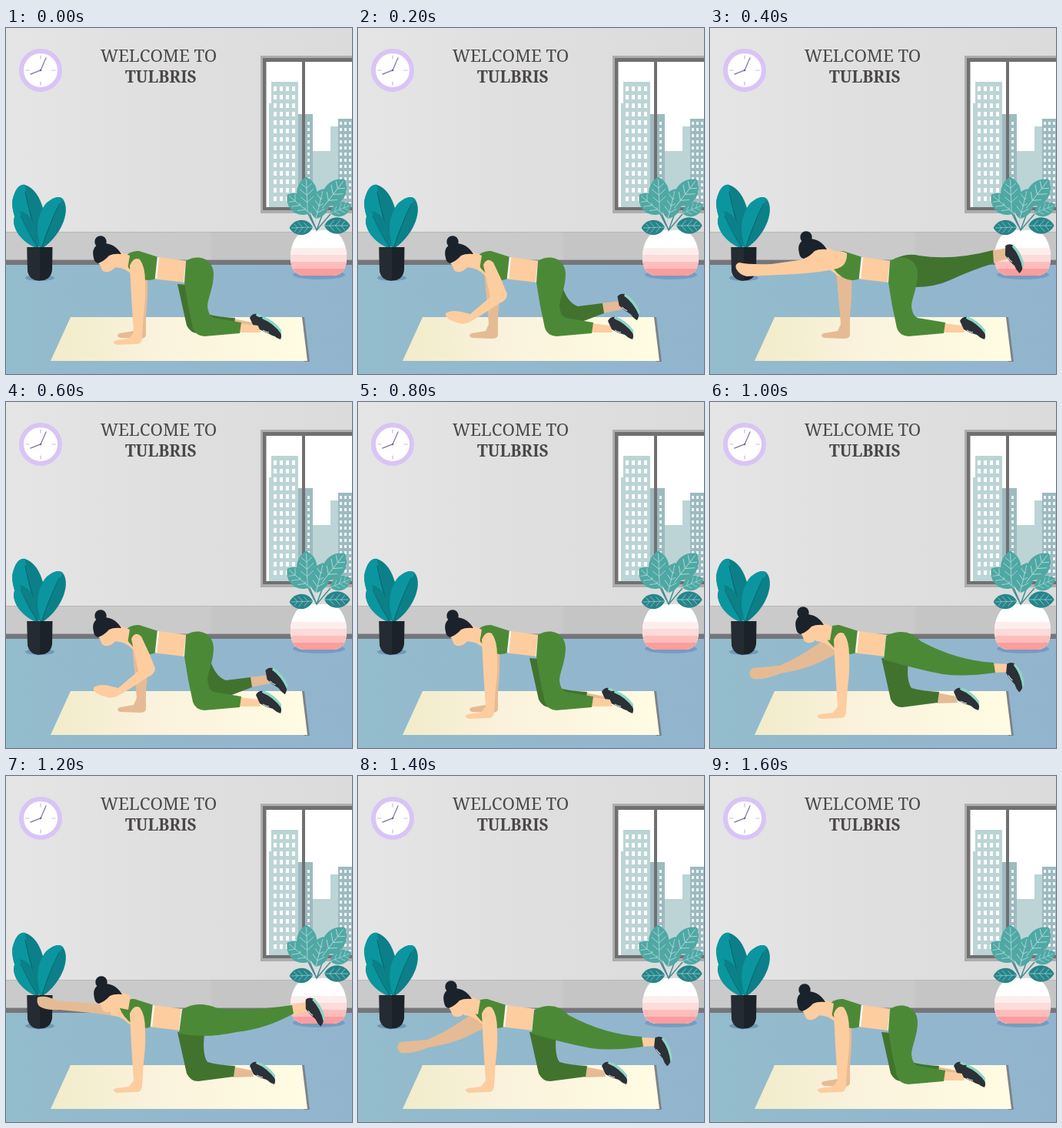
An HTML page without scripts that plays this animation: 450 by 450 pixels, repeating every 1.8 s.

```html
<!DOCTYPE html>
<html lang="en">
<head>
<meta charset="utf-8">
<title>Workout</title>
<style>
  html, body { margin: 0; width: 100%; height: 100%; overflow: hidden; }
  svg { display: block; width: 100vw; height: 100vh; }
  text { font-family: "Noto Serif", serif; fill: #4b4748; text-anchor: middle; }
  .near { fill: #4c8937; }
  .far { fill: #41732f; }
  .skin { fill: #fdcd9f; }
  .tan { fill: #e5bb95; }
  .hair { fill: #1a222b; }
  .pose {
    visibility: hidden;
    animation: show 1.8s step-end infinite;
    animation-delay: calc(var(--i) * .2s - 1.8s);
  }
  @keyframes show {
    0% { visibility: visible; }
    11.1112%, 100% { visibility: hidden; }
  }
</style>
</head>
<body>
<svg viewBox="0 0 450 450">
  <defs>
    <linearGradient id="wall"><stop stop-color="#e5e5e5"/><stop offset=".5" stop-color="#dfdfdf"/><stop offset="1" stop-color="#dbdbdb"/></linearGradient>
    <linearGradient id="floor"><stop stop-color="#93bccc"/><stop offset="1" stop-color="#92b4ce"/></linearGradient>
    <linearGradient id="mat"><stop stop-color="#f1ecca"/><stop offset=".4" stop-color="#faf2dc"/><stop offset="1" stop-color="#fffce3"/></linearGradient>
    <pattern id="panes" x="348" y="76" width="8" height="11" patternUnits="userSpaceOnUse"><path d="M0 0h4v6h-4z" fill="#fff"/></pattern>
    <pattern id="smallPanes" x="434" y="122" width="6" height="8" patternUnits="userSpaceOnUse"><path d="M0 0h3v4h-3z" fill="#eef5f5"/></pattern>

    <g id="leaf">
      <path d="M0 0C-17-18-26-45-18-66Q-8-84 2-80C21-68 19-25 0 0Z" fill="#0b8088"/>
      <path d="M0 0C-17-18-26-45-18-66Q-8-84 2-80Q-3-45 0 0Z" fill="#0b969f"/>
      <path d="M0 0Q-3-40 0-72" fill="none" stroke="#0b5f6b"/>
    </g>
    <g id="sprig">
      <path d="M0 0C-17-8-17-31 0-40C17-31 17-8 0 0Z"/>
      <path d="M0 4V-37M0-8l-8-7M0-8l8-7M0-17l-9-8M0-17l9-8M0-26l-7-6M0-26l7-6" fill="none" stroke="#b4dcda" stroke-width=".8"/>
    </g>

    <g id="shoe">
      <path d="M-17-8Q-14-14-7-13Q6-7 15 6Q17 12 15 16Q9 14 5 10Q-4 8-12 3Z" fill="#2b3136"/>
      <path d="M-8-14Q7-9 16 4L16 9Q6-5-9-11Z" fill="#8fd6c6"/>
      <path d="M-8 4l4 2l4 1" fill="none" stroke="#eef3f3"/>
    </g>

    <path id="armDown" d="M161 309Q166 297 174 301Q181 310 181 330Q182 350 179 372L177 402Q177 411 170 411L144 412Q136 409 143 406L160 404L166 396L163 350Z"/>
    <path id="farArmDown" d="M164 316L184 325Q185 350 182 375L182 400Q181 404 174 404L148 403Q142 400 148 397L166 394L170 385Z"/>
    <path id="farArmHalf" d="M163 298Q176 296 178 310Q174 326 155 332Q130 347 92 353Q70 362 56 360Q47 354 55 346L90 343Q122 330 163 298Z"/>
    <path id="armUp" d="M178 293Q170 288 158 291L115 302L80 307Q50 308 38 305Q32 307 34 313Q38 321 48 323L90 321Q140 319 165 313Q179 309 178 293Z"/>
    <path id="farArmUp" d="M165 300L115 296L66 292Q50 284 41 288Q39 298 46 301Q56 305 70 304L120 309L165 316Z"/>
    <path id="armBent" d="M163 308Q168 297 176 305Q186 325 194 346Q194 354 184 358Q160 374 146 382Q138 387 128 383Q112 378 114 371Q122 366 134 369L146 372L172 350Z"/>

    <g id="farKneel">
      <path class="tan" d="M295 378L320 383L322 391L295 392Z"/>
      <path class="far" d="M223 333L258 336Q255 362 262 372Q275 376 298 377L296 391L250 397Q240 397 235 387Z"/>
      <use href="#shoe" x="334" y="385"/>
    </g>
    <g id="nearKneel">
      <path class="skin" d="M303 384L328 387L331 396L303 396Z"/>
      <path class="near" d="M234 303C252 292 270 302 270 320C270 338 262 352 262 362Q263 374 270 377L306 383L304 397L258 401Q246 400 243 390Q236 360 232 331Z"/>
      <use href="#shoe" x="342" y="389"/>
    </g>
    <g id="farUp">
      <path class="tan" d="M365 290L388 286L390 299L367 306Z"/>
      <path class="far" d="M240 300Q258 292 272 296Q315 303 368 289L369 306Q340 315 312 328Q290 338 262 337Z"/>
      <use href="#shoe" transform="translate(396 298) rotate(26)"/>
    </g>
    <g id="farBent">
      <path class="tan" d="M316 358L342 355L344 366L317 371Z"/>
      <path class="far" d="M250 335L267 340Q274 358 286 362L318 358L320 371L291 382L264 380Z"/>
      <use href="#shoe" transform="translate(352 361) rotate(14)"/>
    </g>
    <g id="nearHalf">
      <path class="skin" d="M367 340L392 341L392 351L368 352Z"/>
      <path class="near" d="M229 304Q256 291 274 311Q320 336 369 339L371 352Q330 358 303 354Q270 348 226 335Z"/>
      <use href="#shoe" transform="translate(397 356) rotate(30)"/>
    </g>
    <g id="nearUp">
      <path class="skin" d="M370 298L394 293L396 305L373 311Z"/>
      <path class="near" d="M229 304Q248 291 275 302Q320 306 372 298L374 309Q338 329 300 333Q260 342 225 335Z"/>
      <use href="#shoe" transform="translate(402 305) rotate(24)"/>
    </g>

    <g id="torso">
      <path class="skin" d="M140 299L160 293L236 303L233 331L190 326L165 322Q156 312 143 311Z"/>
      <path class="near" d="M153 300Q160 289 173 290L198 298L195 326Q184 331 172 324Q158 314 153 300Z"/>
      <path d="M198 298L195 326M235 303L232 331" stroke="#f4f4f1" stroke-width="2.5"/>
    </g>
    <g id="head">
      <path class="skin" d="M119 298Q118 304 122 308L125 315Q129 319 136 316L143 311L158 314L161 296L146 290Z"/>
      <path class="hair" d="M114 299Q110 283 125 280Q141 279 150 294Q140 293 134 296Q128 303 120 306Q115 305 114 299Z"/>
      <circle class="hair" cx="123" cy="278" r="7.7"/>
    </g>

    <g id="rest">
      <use href="#farArmDown" class="tan"/>
      <use href="#farKneel"/>
      <use href="#torso"/>
      <use href="#nearKneel"/>
      <use href="#head"/>
      <use href="#armDown" class="skin"/>
    </g>
    <g id="nearArmBent">
      <use href="#farArmDown" class="tan"/>
      <use href="#farBent"/>
      <use href="#torso"/>
      <use href="#nearKneel"/>
      <use href="#head"/>
      <use href="#armBent" class="skin"/>
    </g>
    <g id="nearArmOut">
      <use href="#farArmDown" class="tan"/>
      <use href="#farUp"/>
      <use href="#torso"/>
      <use href="#nearKneel"/>
      <use href="#head" x="2" y="-6"/>
      <use href="#armUp" class="skin"/>
    </g>
    <g id="farArmRising">
      <use href="#farArmHalf" class="tan"/>
      <use href="#farKneel"/>
      <use href="#torso" x="-5"/>
      <use href="#nearHalf"/>
      <use href="#head" x="-2" y="-4"/>
      <use href="#armDown" class="skin"/>
    </g>
    <g id="farArmOut">
      <use href="#farArmUp" class="tan"/>
      <use href="#farKneel"/>
      <use href="#torso" x="-6"/>
      <use href="#nearUp"/>
      <use href="#head" x="1" y="-10"/>
      <use href="#armDown" class="skin"/>
    </g>
  </defs>

  <rect width="450" height="310" fill="url(#wall)"/>
  <path d="M0 265H450V303H0Z" fill="#c5c5c6"/>
  <path d="M0 265H267V303H0Z" fill="#cacaca"/>
  <path d="M0 265.5H450" stroke="#b8b8ba"/>
  <path d="M0 302H450V308H0Z" fill="#75767a"/>
  <path d="M0 301.500H450" stroke="#a5a5a9"/>
  <rect y="308" width="450" height="142" fill="url(#floor)"/>

  <text x="198.500" y="44" font-size="22.3">WELCOME TO</text>
  <text x="201.5" y="71" font-size="21" font-weight="700">TULBRIS</text>

  <g fill="none" stroke-linecap="round">
    <circle cx="45" cy="55" r="25" fill="#fff" stroke="#d8c4f6" stroke-width="6"/>
    <path d="M45 36v4M45 70v4M26 55h4M60 55h4" stroke="#c9b5e8" stroke-width="1.2"/>
    <path d="M52 39L45 55L32 60" stroke="#8f80a8" stroke-width="1.4"/>
    <circle cx="45" cy="55" r="1.3" fill="#75628f"/>
  </g>

  <g>
    <path d="M331 36H450V241H331Z" fill="#adadad"/>
    <path d="M334 39H450V237H334Z" fill="#707070"/>
    <path d="M338.5 44H385V233H338.5ZM389 44H450V233H389Z" fill="#fff"/>
    <path d="M345 98V70H380V233H342V98Z" fill="#bcd4d5"/>
    <path d="M346 74H378V228H346Z" fill="url(#panes)"/>
    <path d="M380 112H385V233H380ZM389 112H399V233H389Z" fill="#9dbac0"/>
    <path d="M399 160H422V128H433V233H399Z" fill="#bcd4d5"/>
    <path d="M432 118H450V233H432Z" fill="#9dbac0"/>
    <path d="M433 122H450V228H433ZM390 118H398V228H390Z" fill="url(#smallPanes)"/>
  </g>

  <ellipse cx="44" cy="325" rx="19" ry="4" fill="#7497b7"/>
  <use href="#leaf" transform="translate(46 286) rotate(-16) scale(1.06)"/>
  <use href="#leaf" transform="translate(46 287) rotate(22) scale(.88)"/>
  <use href="#leaf" transform="translate(42 287) rotate(-28) scale(.68)"/>
  <path d="M27.500 285H60.500L60 315Q58 328.500 44 328.500Q30 328.500 28 315Z" fill="#1c2229"/>
  <path d="M27.500 285H44V328.500Q30 328.500 28 315Z" fill="#252b33"/>

  <ellipse cx="407" cy="321" rx="34" ry="6" fill="#779cbf"/>
  <clipPath id="pot"><path d="M387 263H427Q443 275 443 298Q443 321 425 322H389Q370 321 370 298Q370 275 387 263Z"/></clipPath>
  <g clip-path="url(#pot)">
    <path d="M370 260h74v64h-74z" fill="#fff"/>
    <path d="M370 286h74v38h-74z" fill="#fdeeed"/>
    <path d="M370 295h74v29h-74z" fill="#fcdbda"/>
    <path d="M370 304h74v20h-74z" fill="#fdbdbb"/>
    <path d="M370 313h74v11h-74z" fill="#fb9d9e"/>
  </g>
  <path d="M391 232L404 263L416 230M392 240L404 263L422 242" fill="none" stroke="#3f8b91" stroke-width="1.4"/>
  <g fill="#4fa8a4">
    <use href="#sprig" transform="translate(395 241) rotate(-50) scale(.95)"/>
    <use href="#sprig" transform="translate(403 248) rotate(14)"/>
    <use href="#sprig" transform="translate(392 235) rotate(-2) scale(1.03)"/>
    <use href="#sprig" transform="translate(414 231) rotate(38) scale(1.08)"/>
    <use href="#sprig" transform="translate(422 241) rotate(68) scale(.72)"/>
  </g>
  <g fill="#26858a">
    <use href="#sprig" transform="translate(414 257) rotate(90) scale(.84)"/>
    <use href="#sprig" transform="translate(399 259) rotate(-92) scale(.76)"/>
  </g>

  <path d="M384 376H388L395 434H388Z" fill="#7d8388"/>
  <path d="M84 376H385L392 433H58Z" fill="url(#mat)"/>

  <use href="#rest" class="pose" style="--i:0"/>
  <use href="#nearArmBent" class="pose" style="--i:1"/>
  <use href="#nearArmOut" class="pose" style="--i:2"/>
  <use href="#nearArmBent" class="pose" style="--i:3"/>
  <use href="#rest" class="pose" style="--i:4"/>
  <use href="#farArmRising" class="pose" style="--i:5"/>
  <use href="#farArmOut" class="pose" style="--i:6"/>
  <use href="#farArmRising" class="pose" style="--i:7"/>
  <use href="#rest" class="pose" style="--i:8"/>
</svg>
</body>
</html>
```
